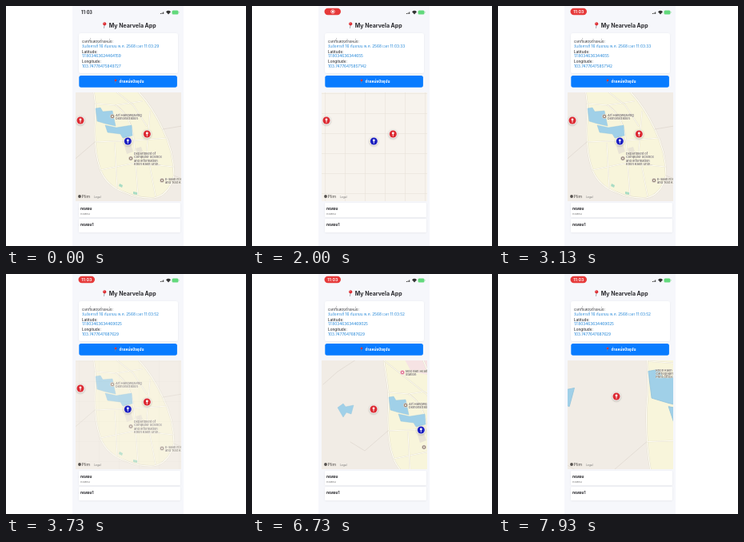
These frames come from a looping animation (300 by 300 pixels, 8 s). An HTML page:

```html
<!DOCTYPE html>
<html lang="th">
<head>
<meta charset="utf-8">
<style>
html, body { margin: 0; width: 100%; height: 100%; overflow: hidden; background: #fff; }
svg { display: block; width: 100vw; height: 100vh; }
text { font-family: Inter, "Noto Sans", "Noto Sans Thai", sans-serif; fill: #3a3a3e; font-size: 4.7px; }
.bold { font-weight: 700; fill: #2a2a2e; }
.medium { font-weight: 500; }
.blue { fill: #3a93dc; font-weight: 500; }
.place { font-size: 3.9px; font-weight: 600; fill: #77716b; stroke: #faf7ed; stroke-width: .6; paint-order: stroke; }
.road { fill: none; stroke-linejoin: round; stroke-linecap: round; vector-effect: non-scaling-stroke; }
.water { fill: #a0d0e8; stroke: #93c4dc; stroke-width: .4; }
</style>
</head>
<body>
<svg viewBox="0 0 300 300">
  <defs>
    <clipPath id="frame"><rect x="87" y="108" width="132" height="136"/></clipPath>
    <pattern id="tiles" x="91" y="109" width="25" height="25" patternUnits="userSpaceOnUse">
      <rect width="25" height="25" fill="#f7f3ed"/>
      <path d="M0 0H25M0 0V25" stroke="#e6dfd5" stroke-width="1"/>
    </pattern>
    <filter id="soft" x="-20%" y="-20%" width="140%" height="150%">
      <feDropShadow dx="0" dy=".5" stdDeviation=".9" flood-opacity=".07"/>
    </filter>
    <filter id="lift" x="-40%" y="-40%" width="180%" height="180%">
      <feDropShadow dx="0" dy=".6" stdDeviation=".8" flood-opacity=".35"/>
    </filter>
    <g id="pushpin">
      <path d="M0 0L-.7 4" stroke="#8c8c92" stroke-width=".7"/>
      <circle cy="-1" r="1.9" fill="#dc2f35"/>
      <circle cx="-.5" cy="-1.6" r=".5" fill="#ff8b88"/>
    </g>
  </defs>

  <rect x="83" width="139" height="300" fill="#f6f7fb"/>

  <text id="clock" class="bold" x="101" y="10" text-anchor="middle" style="font-size:5.5px">11:03</text>
  <g id="pill">
    <rect x="90.5" y="2.8" width="20.5" height="8.4" rx="4.2" fill="#e63a3a"/>
    <g id="rec"><circle cx="101" cy="7" r="2.3" fill="none" stroke="#fff" stroke-width=".7"/><circle cx="101" cy="7" r="1.2" fill="#fff"/></g>
    <text id="pillClock" x="100.8" y="9" text-anchor="middle" style="font-size:5.4px;font-weight:600;fill:#fff">11:03</text>
  </g>
  <g fill="#333">
    <path d="M193 9h1v1h-1zM194.6 8.5h1v1.5h-1zM196.2 7.6h1v2.4h-1z"/>
    <path d="M200 7.2Q203 4.5 206 7.2L203 10.5Z"/>
  </g>
  <rect x="207.5" y="5.4" width="8" height="5" rx="1.5" fill="#62d97c"/>
  <rect x="216" y="7" width=".7" height="1.6" rx=".3" fill="#a9dfb5"/>

  <use href="#pushpin" transform="translate(123.2 23.4) scale(1.1)"/>
  <text class="bold" x="128.7" y="26.8" style="font-size:7px">My Nearvela App</text>

  <rect x="91" y="34" width="124" height="50" rx="3" fill="#fff" filter="url(#soft)"/>
  <text class="medium" x="95" y="45.8">เวลาที่แสดงตำแหน่ง:</text>
  <text class="blue" id="stamp" x="95" y="51.6"></text>
  <text class="medium" x="95" y="58.6">Latitude:</text>
  <text class="blue" id="lat" x="95" y="64.2"></text>
  <text class="medium" x="95" y="71">Longitude:</text>
  <text class="blue" id="lon" x="95" y="76.8"></text>

  <rect x="91.3" y="87" width="122.6" height="14.7" rx="2.6" fill="#087cff"/>
  <use href="#pushpin" transform="translate(137 93.7) scale(.72)"/>
  <text x="141.5" y="96.2" style="font-weight:600;fill:#fff">ตำแหน่งปัจจุบัน</text>

  <g clip-path="url(#frame)">
    <rect x="87" y="108" width="132" height="136" fill="#f1ece5"/>
    <g id="land"></g>
    <g id="places"></g>
    <rect id="blank" x="87" y="108" width="132" height="136" fill="url(#tiles)"/>
    <g id="markers"></g>
    <circle cx="92" cy="238" r="1.9" fill="#55514e"/>
    <text x="94.5" y="240" style="font-size:5.4px;fill:#55514e">Plim</text>
    <text x="110" y="239.8" style="font-size:3.3px;fill:#777">Legal</text>
  </g>

  <rect x="91" y="246" width="127" height="18" rx="1.5" fill="#fff" filter="url(#soft)"/>
  <rect x="91" y="266" width="127" height="17" rx="1.5" fill="#fff" filter="url(#soft)"/>
  <g id="row1">
    <text class="bold" x="93" y="255">ทดสอบ</text>
    <text x="93" y="260.6" style="font-size:4px;fill:#777">ทดสอบ</text>
  </g>
  <text id="row2" class="bold" x="93" y="275">ทดสอบ1</text>
</svg>
<script>
const LOOP = 8000;
const $ = id => document.getElementById(id);

const road = (d, width, color) => `<path class="road" d="${d}" stroke="${color}" stroke-width="${width}"/>`;
const street = d => road(d, 1.6, '#e6e0cb') + road(d, .9, '#fffef8');
const campus = 'M104 70L110 110Q113 128 111 150Q110 182 118 205Q126 225 148 233Q166 241 185 240Q204 236 210 212Q210 182 196 154Q183 126 166 108L150 70Z';

$('land').innerHTML =
  `<path d="${campus}" fill="#f8f5db"/>
   <path d="M126 70H175L172 102L140 96Z" fill="#f6e3e4"/>` +
  road(campus, 2, '#dfd9c9') + road(campus, 1.2, '#fffdf4') +
  ['M112 122L137 124L170 119', 'M137 124Q157 137 160 168L165 237', 'M111 170L160 168L202 165',
   'M118 205L162 196L209 201', 'M180 132L176 180L187 238', 'M136 172L139 228', 'M106 82L159 124L176 150']
    .map(street).join('') +
  ['M30 112L48 96L88 70', 'M64 184L82 195L111 170', 'M210 212L240 224', 'M196 154L232 148L250 120']
    .map(d => road(d, .7, '#ddd6cd')).join('') +
  `<path class="water" d="M112 128L118 127L121 132L133 131L137 150L124 147L114 144Z"/>
   <path class="water" d="M124 149L138 152L157 149L158 162L146 165L143 160L127 158Z"/>
   <path class="water" d="M48 141L55 136L58 140L68 138L65 149L59 147L55 153Z"/>
   <path class="water" d="M224 230l6-2 1 6-6 1zM233 229l6-1v6l-5 1z"/>
   <path d="M142 222l4 2-1 3-4-2zM159 232l5 1v3l-5-1z" fill="#a9dcc4"/>
   <path d="M148 175l8-2 3 9-8 3zM162 178l7-2 2 6-7 2z" fill="#e9e4d6"/>`;

const places = [
  { x: 133, y: 138, color: '#9a8878', lines: ['Art Handweaving', 'Demonstration'] },
  { x: 156, y: 190.5, color: '#9a8878', dy: -4.5, lines: ['Department of', 'Computer Science', 'and Information', 'Khon Kaen Univ...'] },
  { x: 195, y: 218, color: '#9a8878', lines: ['E-saan Food Lab', 'and Test Kitchen'] },
  { x: 129, y: 97, color: '#e0708f', lines: ['Moo Ban Health', 'Station'] },
  { x: 114.5, y: 128, near: true, lines: ['Khon Kaen', 'Cartography', 'Print Office'] }
];
$('places').innerHTML = places.map(({ color, lines, dy = 0 }) => `<g>
  ${color ? `<circle r="2.7" fill="${color}" stroke="#fff" stroke-width=".5"/><circle r=".9" fill="#fff"/>` : ''}
  ${lines.map((s, i) => `<text class="place" x="4" y="${dy + i * 4.4}">${s}</text>`).join('')}</g>`).join('');

const markers = [
  { x: 93, y: 143, color: '#dc2a32' },
  { x: 176.3, y: 160, color: '#dc2a32' },
  { x: 152.3, y: 169, color: '#1b1fc0' }
];
$('markers').innerHTML = markers.map(m => `<g>
  <circle r="5.3" fill="#f3eeee" filter="url(#lift)"/>
  <circle r="4.5" fill="${m.color}"/>
  <circle cy="-1.1" r="1.4" fill="#fff"/><path d="M0 0V2.8" stroke="#fff" stroke-width=".9"/></g>`).join('');

// time, pan x, pan y, zoom
const camera = [
  [0, 0, 0, 1], [70, 0, 0, 1], [1200, 6, 0, 1], [1870, 6, 0, 1], [1870, 0, 0, 1],
  [4400, 0, 0, 1], [5000, -24, 9, 1], [5650, -24, 9, 1], [6350, 59, 26, 1],
  [7000, 59, 26, 1], [7870, -47.3, -147.3, 2.1], [LOOP, -47.3, -147.3, 2.1]
];
const blank = [[0, 0], [1870, 0], [1870, 1], [2450, 1], [2670, 0], [3330, 0], [3330, 1], [3500, 1], [3850, 0], [LOOP, 0]];
const readings = [
  [0, '29', '17.803463624464159', '103.74778475849727'],
  [1870, '33', '17.8034636344655', '103.74776475857142'],
  [3330, '52', '17.803463634469025', '103.7477647687629']
];

const ease = p => p * p * (3 - 2 * p);

function sample(keys, t) {
  const i = Math.max(1, keys.findIndex(k => k[0] > t));
  const [a, b] = [keys[i - 1], keys[i]];
  const p = ease((t - a[0]) / (b[0] - a[0]));
  return a.slice(1).map((v, n) => v + (b[n + 1] - v) * p);
}

const press = (t, start) => t < start || t > start + 250 ? 1 : 1 - .7 * Math.sin((t - start) / 250 * Math.PI);
const show = (id, on) => $(id).style.display = on ? '' : 'none';

function draw(t) {
  const [px, py, zoom] = sample(camera, t);
  const put = (items, group) => items.forEach((m, i) =>
    $(group).children[i].setAttribute('transform', `translate(${m.x * zoom + px} ${m.y * zoom + py})`));
  $('land').setAttribute('transform', `translate(${px} ${py}) scale(${zoom})`);
  put(places, 'places');
  put(markers, 'markers');
  places.forEach((p, i) => $('places').children[i].style.display = !p.near || zoom > 1.6 ? '' : 'none');
  $('blank').style.opacity = sample(blank, t)[0];

  const [, sec, lat, lon] = readings.filter(r => r[0] <= t).pop();
  $('stamp').textContent = `วันอังคารที่ 16 กันยายน พ.ศ. 2568 เวลา 11:03:${sec}`;
  $('lat').textContent = lat;
  $('lon').textContent = lon;

  const recording = t < 2730;
  show('clock', t < 200);
  show('pill', t >= 200);
  show('rec', recording);
  show('pillClock', !recording);
  $('row1').style.opacity = press(t, 4400);
  $('row2').style.opacity = press(t, 5330);
}

const start = performance.now();
function tick() {
  draw((performance.now() - start) % LOOP);
  requestAnimationFrame(tick);
}
tick();
</script>
</body>
</html>
```
